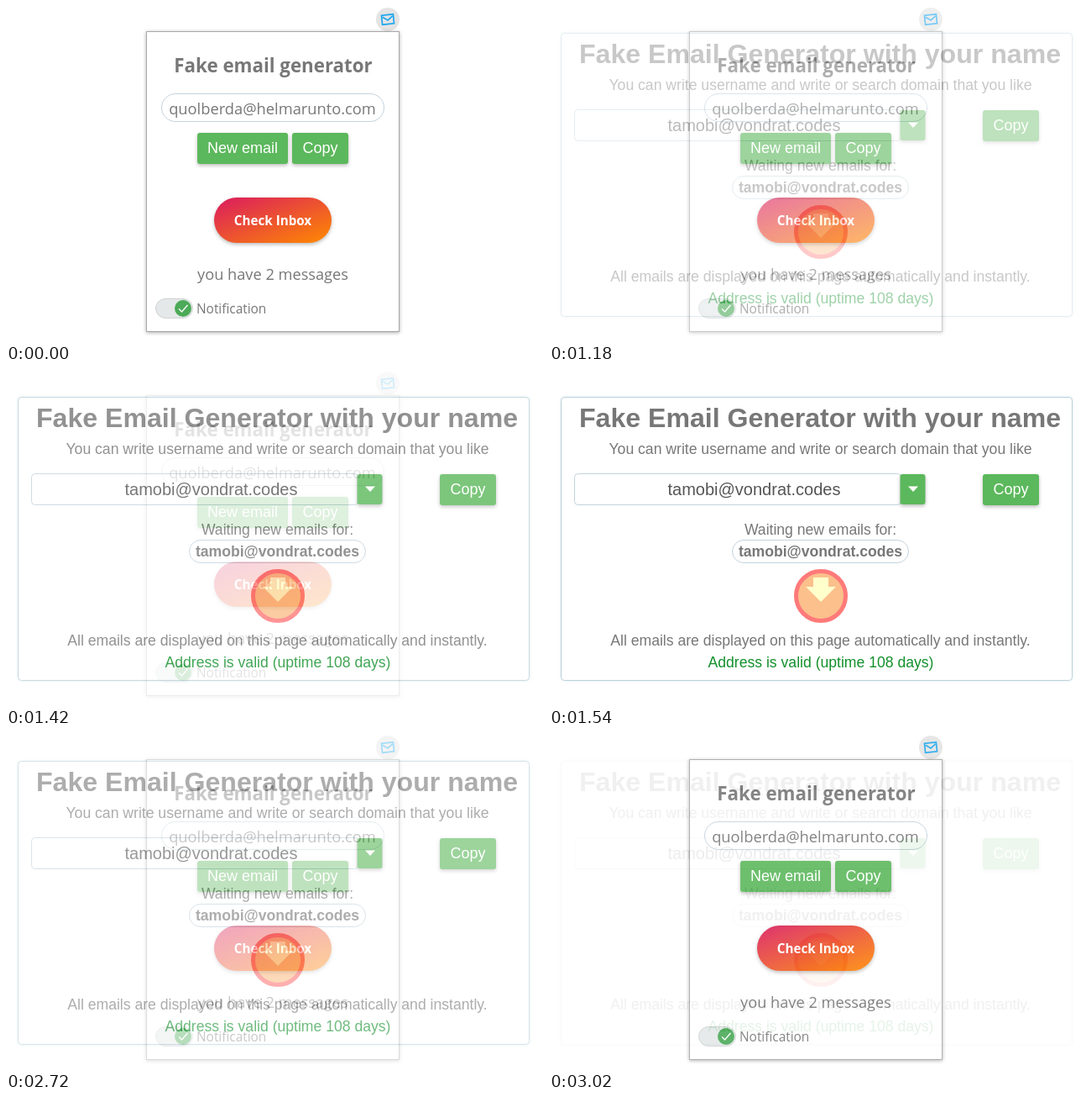
An HTML page for the animation above (3080 ms loop, 640 by 400 pixels).

```html
<!DOCTYPE html>
<html lang="en">
<head>
<meta charset="utf-8">
<title>Email generator</title>
<style>
html, body { margin: 0; width: 100%; height: 100%; overflow: hidden; background: #fff; }
svg { display: block; width: 640px; height: 400px; }
text { text-anchor: middle; fill: #777; font: 17.6px "Liberation Sans", Arial, sans-serif; }
.ui { font-family: "Open Sans", "Noto Sans", sans-serif; }
.bold { font-weight: 700; }
.label { fill: #fff; font-size: 18px; }
.btn { fill: #5cb85c; filter: drop-shadow(0 2px 2px #0004); }
.field { fill: #fff; stroke: #c3d3dd; }
</style>
</head>
<body>
<svg viewBox="0 0 640 400">
  <defs>
    <linearGradient id="warm" x1="0" y1="0" x2="1" y2="1">
      <stop offset="0" stop-color="#da1b60"/>
      <stop offset="1" stop-color="#ff8a00"/>
    </linearGradient>
  </defs>

  <g id="popup">
    <rect width="640" height="400" fill="#fff"/>
    <circle cx="455" cy="16" r="14" fill="#e4e4e4"/>
    <g transform="rotate(-6 455 16)" fill="none" stroke="#1ea7ee" stroke-width="1.7">
      <rect x="448" y="10.5" width="14" height="11"/>
      <path d="M449 12.5l6 4.5 6-4.5"/>
    </g>
    <rect x="167.5" y="30.5" width="301" height="357" fill="#fff" stroke="#a9a9a9" style="filter:drop-shadow(0 1px 2px #0005)"/>
    <text class="ui bold" x="318.5" y="79" style="font-size:22.3px">Fake email generator</text>
    <rect class="field" x="185.5" y="104.5" width="265" height="33" rx="16.5"/>
    <text class="ui" x="317.5" y="129" style="font-size:18.3px">quolberda@helmarunto.com</text>
    <rect class="btn" x="228" y="151" width="108" height="37" rx="3"/>
    <text class="label" x="282" y="175">New email</text>
    <rect class="btn" x="341" y="151" width="67" height="37" rx="3"/>
    <text class="label" x="374.5" y="175">Copy</text>
    <rect x="248" y="228" width="140" height="54" rx="27" fill="url(#warm)" style="filter:drop-shadow(0 2px 2px #0004)"/>
    <text class="ui bold" x="318" y="261" style="font-size:15.2px;fill:#fff">Check Inbox</text>
    <text class="ui" x="318" y="326" style="font-size:18.2px">you have 2 messages</text>
    <rect x="178.5" y="348.5" width="44" height="23" rx="11.5" fill="#e4e8e8" stroke="#d0d3d3"/>
    <circle cx="211" cy="360" r="10" fill="#4caa58"/>
    <path d="M206 360.5l3.5 3.5 7-8" fill="none" stroke="#fff" stroke-width="1.3"/>
    <text class="ui" x="227" y="366" style="font-size:15.4px;text-anchor:start">Notification</text>
  </g>

  <g id="page">
    <rect width="640" height="400" fill="#fff"/>
    <rect x="14.5" y="32.5" width="609" height="337" rx="4" fill="#fff" stroke="#bdd2da" style="filter:drop-shadow(0 0 1.5px #9bc4d366)"/>
    <text class="bold" x="323" y="68" style="font-size:32.1px">Fake Email Generator with your name</text>
    <text x="323.5" y="100">You can write username and write or search domain that you like</text>
    <rect class="field" x="30.5" y="123.5" width="389" height="37" rx="4"/>
    <text x="244.5" y="149" style="font-size:20px;fill:#555">tamobi@vondrat.codes</text>
    <rect class="btn" x="418.5" y="124" width="30" height="36" rx="3"/>
    <path d="M428 138.5h12l-6 6.5z" fill="#fff"/>
    <rect class="btn" x="517" y="124" width="67" height="37" rx="3"/>
    <text class="label" x="550.5" y="148">Copy</text>
    <text x="323.5" y="196">Waiting new emails for:</text>
    <rect class="field" x="218.5" y="202.5" width="210" height="27" rx="13.5"/>
    <text class="bold" x="323.5" y="222">tamobi@vondrat.codes</text>
    <circle cx="324" cy="269" r="29.5" fill="#fbc08c" stroke="#ff7a7a" stroke-width="5"/>
    <path d="M315 247h18v11h9l-18 18-18-18h9z" fill="#ffc"/>
    <text x="323.5" y="328">All emails are displayed on this page automatically and instantly.</text>
    <text x="324" y="354" style="fill:#12902b">Address is valid (uptime 108 days)</text>
  </g>
</svg>
<script>
const LOOP = 3080, HOLD = 1000, HALF = 1540, STEP = 60;
const page = document.getElementById("page");

// Each half holds one scene, then cross-fades to the other in tenths.
function pageOpacity(t) {
  const local = t % HALF;
  const mix = local < HOLD ? 0 : (Math.floor((local - HOLD) / STEP) + 1) / 10;
  return t < HALF ? mix : 1 - mix;
}

const start = performance.now();
function draw() {
  page.style.opacity = pageOpacity((performance.now() - start) % LOOP);
  requestAnimationFrame(draw);
}
draw();
</script>
</body>
</html>
```
